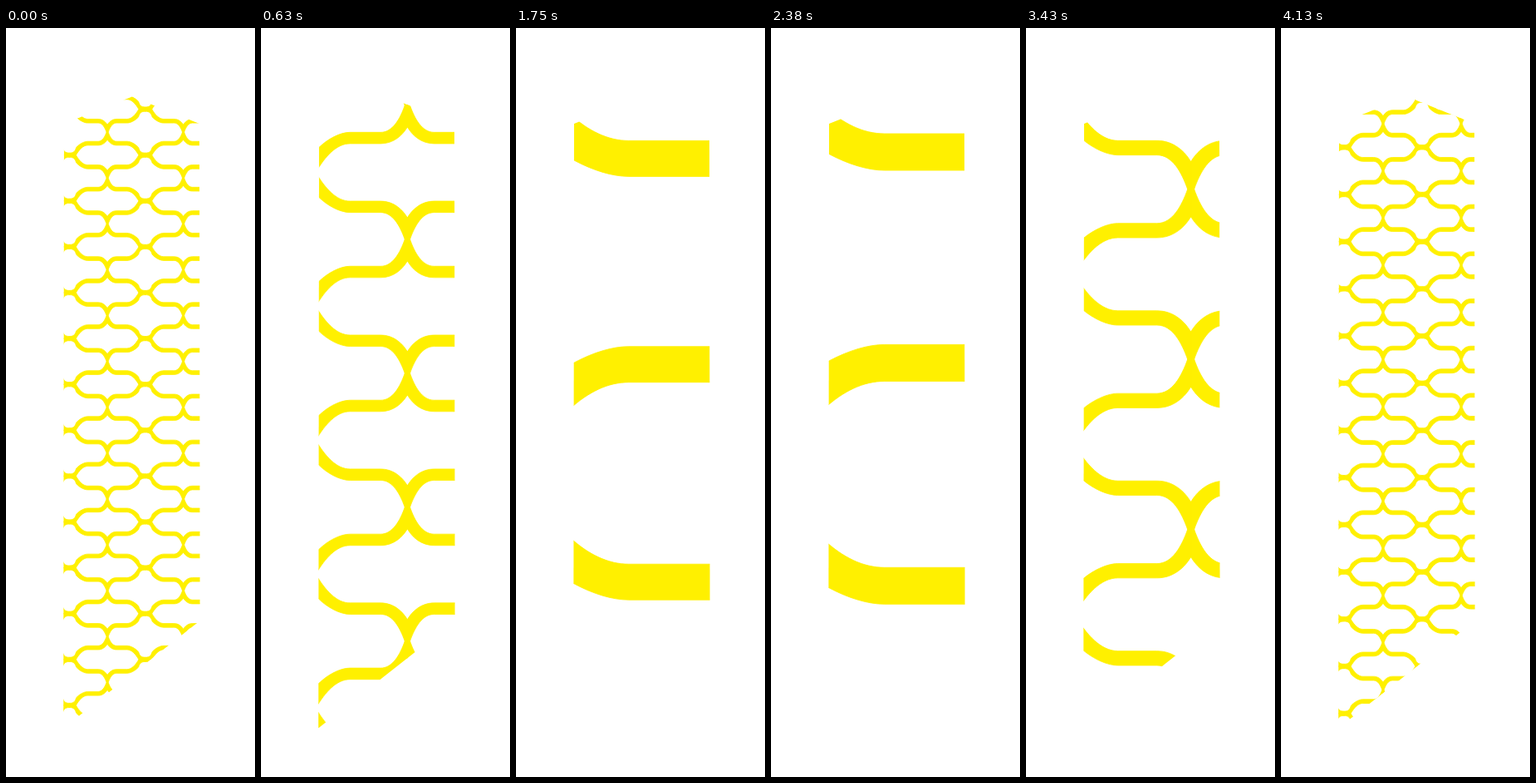
These frames come from a looping animation (300 by 900 pixels, 4200 ms). An HTML page with a canvas:

```html
<!DOCTYPE html>
<html lang="en">
<head>
<meta charset="utf-8">
<title>Zooming lattice</title>
<style>
  html, body { margin: 0; width: 100%; height: 100%; overflow: hidden; background: #fff; }
  canvas { display: block; width: 300px; height: 900px; }
</style>
</head>
<body>
<canvas id="stage"></canvas>
<script>
const WIDTH = 300, HEIGHT = 900;
const LOOP = 4200, STEP = 70;
const HALF = 0.83;   // half a tile's width; a tile is 1 high
const LAP = 0.003;   // overlap that hides seams between mirrored quarters
const OUTLINE = 0.8; // constant outline that keeps small tiles bold
const YELLOW = '#fff000';

const canvas = document.getElementById('stage');
const ctx = canvas.getContext('2d');
const ratio = window.devicePixelRatio || 1;
canvas.width = WIDTH * ratio;
canvas.height = HEIGHT * ratio;

// Window the lattice is seen through.
const frame = new Path2D('M70 115 L152 82.5 L233 115 L233.6 712.3 L69.2 841.3 Z');

// One quarter of a tile, from the narrow crossing (0,0) to the wide one (HALF,0.5).
function makeQuarter() {
  const p = new Path2D();
  const wide = (...c) => c.map((n, i) => (i % 2 ? 0.5 - n : HALF - n));
  p.moveTo(-LAP, -LAP);
  p.lineTo(0.0195, -LAP);
  p.lineTo(0.0195, 0);
  p.bezierCurveTo(0.055, 0.1, 0.11, 0.2008, 0.2, 0.2008);
  p.lineTo(...wide(0.4, 0.2992));
  p.bezierCurveTo(...wide(0.325, 0.2992, 0.222, 0.246, 0.15, 0.168));
  p.bezierCurveTo(...wide(0.125, 0.09, 0.1, 0.047, 0, 0.047));
  p.lineTo(...wide(-LAP, 0.047));
  p.lineTo(...wide(-LAP, -LAP));
  p.lineTo(...wide(0.144, -LAP));
  p.lineTo(...wide(0.144, 0));
  p.bezierCurveTo(...wide(0.215, 0.12, 0.3, 0.2147, 0.4, 0.2147));
  p.lineTo(0.2, 0.2853);
  p.bezierCurveTo(0.1, 0.2853, 0.035, 0.22, 0, 0.162);
  p.lineTo(-LAP, 0.162);
  p.closePath();
  return p;
}
const quarter = makeQuarter();

// Tile height: eases up for half the loop, then back down.
function tileSize(time) {
  const half = LOOP / 2;
  const u = 1 - Math.abs(time - half) / half;
  return 55.1 + 490 * u * u * (3 - 2 * u);
}

function draw(time) {
  const size = tileSize(time), span = 2 * HALF * size;
  const x0 = 93.9 + 0.5125 * size;
  const y0 = 477.05 - 0.3862 * size;

  ctx.setTransform(ratio, 0, 0, ratio, 0, 0);
  ctx.fillStyle = '#fff';
  ctx.fillRect(0, 0, WIDTH, HEIGHT);
  ctx.save();
  ctx.clip(frame);
  ctx.fillStyle = ctx.strokeStyle = YELLOW;
  ctx.lineWidth = OUTLINE / size;
  ctx.lineJoin = 'round';

  const firstCol = Math.floor((69 - x0) / span), lastCol = Math.ceil((234 - x0) / span);
  const firstRow = Math.floor((82 - y0) / size), lastRow = Math.ceil((842 - y0) / size);
  for (let col = firstCol; col <= lastCol; col++) {
    for (let row = firstRow; row <= lastRow; row++) {
      for (const sx of [size, -size]) {
        for (const sy of [size, -size]) {
          ctx.save();
          ctx.translate(x0 + col * span, y0 + row * size);
          ctx.scale(sx, sy);
          ctx.fill(quarter);
          ctx.stroke(quarter);
          ctx.restore();
        }
      }
    }
  }
  ctx.restore();
}

let start = null;
function tick(now) {
  if (start === null) start = now;
  const time = Math.max(0, now - start) % LOOP;
  draw(Math.floor(time / STEP) * STEP);
  requestAnimationFrame(tick);
}
draw(0);
requestAnimationFrame(tick);
</script>
</body>
</html>
```
